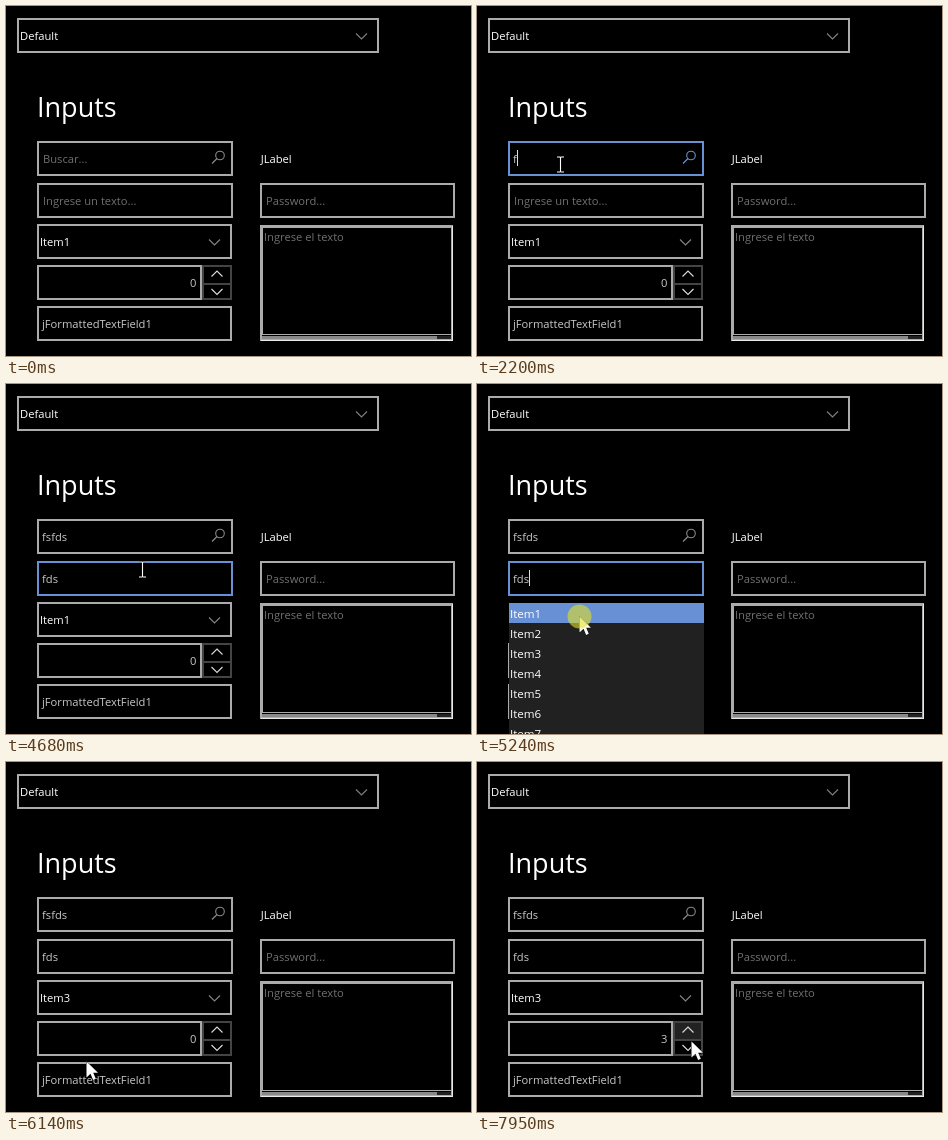
Animation, 465 px wide and 350 px high, one loop 8000 ms. Source, as an HTML page with a canvas:

```html
<!DOCTYPE html>
<html lang="es">
<head>
<meta charset="utf-8">
<title>Inputs</title>
<style>
html, body { margin: 0; width: 100%; height: 100%; overflow: hidden; background: #000; }
canvas { display: block; }
</style>
</head>
<body>
<canvas id="stage" width="465" height="350"></canvas>
<script>
const ctx = document.getElementById('stage').getContext('2d');
const LOOP = 8000;
const FAMILY = '"Open Sans", "Noto Sans", sans-serif';
const GRAY = '#ababab', DIM = '#666', BLUE = '#6890d4', HINT = '#707070', TYPED = '#c8c8c8';

// Screen refresh bursts: start, end, number of steps
const bursts = [
  [130, 900, 12], [970, 1440, 6], [1590, 2340, 10], [2410, 3170, 11],
  [3240, 3940, 10], [4070, 4820, 10], [4890, 5660, 12], [5730, 5870, 3],
  [6070, 6560, 8], [6780, 7060, 5], [7260, 7950, 10]
];

// Pointer path: time, x, y, shape from here on
const path = [
  [130, 110, 141, 'beam'], [400, 106, 240, 'arrow'], [480, 106, 266, 'beam'],
  [620, 108, 325, 'beam'], [830, 100, 268, 'beam'], [900, 100, 236, 'arrow'],
  [1160, 104, 205, 'beam'], [1440, 101, 164, 'beam'], [1590, 101, 164, 'beam'],
  [1900, 83, 158, 'beam'], [2600, 83, 158, 'beam'], [2850, 95, 195, 'beam'],
  [2950, 95, 195, 'beam'], [3170, 120, 215, 'arrow'], [3500, 195, 212, 'arrow'],
  [3700, 225, 196, 'hand'], [3800, 225, 196, 'hand'], [3940, 210, 202, 'hand'],
  [4100, 210, 202, 'hand'], [4300, 180, 190, 'beam'], [4450, 150, 184, 'beam'],
  [4820, 125, 186, 'beam'], [5000, 108, 218, 'arrow'], [5160, 102, 232, 'arrow'],
  [5400, 102, 232, 'arrow'], [5660, 92, 264, 'arrow'], [5800, 88, 303, 'arrow'],
  [5870, 86, 274, 'arrow'], [6068, 86, 274, 'arrow'], [6138, 80, 299, 'arrow'],
  [6200, 84, 312, 'beam'], [6300, 110, 340, 'beam'], [6480, 195, 290, 'arrow'],
  [6560, 214, 274, 'arrow'], [6780, 218, 272, 'arrow'], [6850, 222, 271, 'arrow'],
  [7060, 222, 271, 'arrow'], [7260, 222, 268, 'arrow'], [7700, 222, 268, 'arrow'],
  [7950, 214, 279, 'arrow']
];

const clicks = [[1400, 1590], [2850, 2950], [3900, 4070], [5160, 5300],
                [5860, 6070], [6840, 6980], [7330, 7430], [7560, 7660]];
const within = (t, [a, b]) => t >= a && t < b;

let mouse = null;

function stepTime(t) {
  const burst = bursts.filter(b => t >= b[0]).pop();
  if (!burst) return 0;
  const [start, end, n] = burst;
  const step = (end - start) / (n - 1);
  return start + Math.min(n - 1, Math.floor((t - start) / step + 1e-6)) * step;
}

function pointerAt(t) {
  if (t < path[0][0]) return null;
  let i = 0;
  while (i < path.length - 1 && t >= path[i + 1][0]) i++;
  const a = path[i], b = path[i + 1] || a;
  const k = b === a ? 0 : (t - a[0]) / (b[0] - a[0]);
  return {
    x: Math.round(a[1] + (b[1] - a[1]) * k),
    y: Math.round(a[2] + (b[2] - a[2]) * k),
    shape: a[3]
  };
}

const typed = (word, times, t) => word.slice(0, times.filter(k => t >= k).length);

function fill(color, x, y, w, h) {
  ctx.fillStyle = color;
  ctx.fillRect(x, y, w, h);
}

// Borders dim under the pointer
function box(x, y, w, h, color) {
  const hover = mouse && within(mouse.x, [x, x + w]) && within(mouse.y, [y, y + h]);
  ctx.strokeStyle = color || (hover ? DIM : GRAY);
  ctx.lineWidth = 2;
  ctx.strokeRect(x + 1, y + 1, w - 2, h - 2);
}

function line(color, width, ...pts) {
  ctx.strokeStyle = color;
  ctx.lineWidth = width;
  ctx.beginPath();
  for (let i = 0; i < pts.length; i += 2) ctx.lineTo(pts[i], pts[i + 1]);
  ctx.stroke();
}

function text(str, x, y, color = '#fff', align = 'left', font = '11.2px ') {
  ctx.font = font + FAMILY;
  ctx.fillStyle = color;
  ctx.textAlign = align;
  ctx.fillText(str, x, y);
}

function chevron(x, y, color, dir = 1) {
  line(color, 1.1, x - 5.5, y - 2.5 * dir, x, y + 3 * dir, x + 5.5, y - 2.5 * dir);
}

function field(x, y, w, value, hint, focused, caret) {
  box(x, y, w, 35, focused && BLUE);
  if (value) text(value, x + 5, y + 22, TYPED);
  else text(hint, x + 6, y + 22, HINT);
  if (focused && caret) {
    ctx.font = '11.2px ' + FAMILY;
    fill('#ddd', Math.round(x + 5 + ctx.measureText(value).width), y + 9, 1, 16);
  }
}

function magnifier(color) {
  ctx.strokeStyle = color;
  ctx.lineWidth = 1.1;
  ctx.beginPath();
  ctx.arc(214, 149.5, 4.3, 0, Math.PI * 2);
  ctx.stroke();
  line(color, 1.2, 211, 152.5, 206, 157.5);
}

function clearIcon() {
  line('#3a3a3a', 1, 206.5, 186.5, 222.5, 202);
  line('#3a3a3a', 1, 222.5, 186.5, 206.5, 202);
}

function combo(item) {
  box(31, 218, 195, 35);
  text(item, 34, 240);
  chevron(208.5, 236, '#858585');
}

function spinner(value, hover) {
  box(31, 259, 165, 35);
  text(value, 190.5, 281, TYPED, 'right');
  fill('#444', 196, 259, 30, 35);
  fill(hover ? '#222' : '#000', 198, 261, 26, 16);
  fill('#000', 198, 279, 26, 13);
  chevron(211, 268, '#ddd', -1);
  chevron(211, 285.5, '#ddd');
}

function textArea() {
  fill(GRAY, 254, 219, 193, 116);
  fill('#000', 257, 222, 188, 106);
  fill('#000', 256, 329, 189, 4);
  fill('#888', 256, 330, 175, 3);
  fill('#222', 431, 330, 14, 3);
  fill('#e8e8e8', 255, 334, 192, 1);
  fill('#e8e8e8', 446, 220, 1, 115);
  text('Ingrese el texto', 258, 235, HINT);
}

function popup(y) {
  fill('#212121', 32, 219, 195, 131);
  const active = Math.max(0, Math.floor((y - 220) / 20));
  for (let i = 0; i < 7; i++) {
    const top = 219 + i * 20;
    if (i === active) fill(BLUE, 32, top, 195, 20);
    text('Item' + (i + 1), 33, top + 15, '#fff', 'left', '11.6px ');
  }
}

const shapes = {
  arrow: 'M0 0V16L4 12.3L6.6 18.4L9.3 17.2L6.7 11.3H11.5Z',
  hand: 'M-2 1Q0 -1 2 1V6L8 7.5Q9.5 8 9 11L8 15V19H0V17L-5 10.5Q-5 8 -2 9.5Z',
  beam: 'M-3.5 -7.5H-.8L0 -7L.8 -7.5H3.5M0 -7V7M-3.5 7.5H-.8L0 7L.8 7.5H3.5'
};
for (const name in shapes) shapes[name] = new Path2D(shapes[name]);

function pointer({ x, y, shape }, pressed) {
  ctx.save();
  ctx.translate(x + .5, y + .5);
  ctx.lineWidth = shape === 'beam' ? 2.4 : 1;
  ctx.strokeStyle = '#000';
  ctx.stroke(shapes[shape]);
  if (shape === 'beam') {
    ctx.lineWidth = 1.1;
    ctx.strokeStyle = '#fff';
    ctx.stroke(shapes.beam);
  } else {
    ctx.fillStyle = '#fff';
    ctx.fill(shapes[shape]);
  }
  if (shape === 'hand') {
    line('#000', .7, 2, 6, 2, 10);
    line('#000', .7, 4.7, 7, 4.7, 10.5);
    line('#000', .7, 7, 8, 7, 11);
  }
  if (pressed) {
    ctx.fillStyle = 'rgba(225,225,40,.6)';
    ctx.beginPath();
    ctx.arc(0, 0, 12, 0, Math.PI * 2);
    ctx.fill();
  }
  ctx.restore();
}

function draw(now) {
  const t = stepTime(now);
  mouse = pointerAt(t);
  const caret = within(t, [2150, 3000]) || t % 1000 < 600;
  const searching = within(t, [1400, 2840]);
  const writing = within(t, [2840, 5400]);
  const query = typed('fsfds', [2150, 2290, 2400, 2480, 2560], t);
  const entry = t < 4070
    ? typed('fdsfds', [2940, 3020, 3090, 3240, 3310, 3390], t)
    : typed('fds', [4380, 4460, 4540], t);

  fill('#000', 0, 0, 465, 350);
  box(11, 12, 362, 35);
  text('Default', 14, 34);
  chevron(355.5, 30, '#808080');
  text('Inputs', 31, 111, '#fff', 'left', '400 27px ');

  field(31, 135, 196, query, 'Buscar...', searching, caret);
  magnifier(searching ? BLUE : '#8a8a8a');
  field(31, 177, 196, entry, 'Ingrese un texto...', writing, caret);
  if (within(t, [3300, 4070])) clearIcon();

  const open = within(t, [5160, 6068]);
  if (!open) combo(t < 6070 ? 'Item1' : 'Item3');
  spinner([6850, 7340, 7570].filter(k => t >= k).length, t >= 6500);
  box(31, 300, 195, 35);
  text('jFormattedTextField1', 36, 322, TYPED);

  text('JLabel', 254.7, 157);
  field(254, 177, 195, '', 'Password...', false);
  textArea();

  if (open) popup(mouse.y);
  if (mouse) pointer(mouse, clicks.some(c => within(t, c)));
}

const begin = performance.now();
function tick() {
  draw((performance.now() - begin) % LOOP);
  requestAnimationFrame(tick);
}
tick();
</script>
</body>
</html>
```
